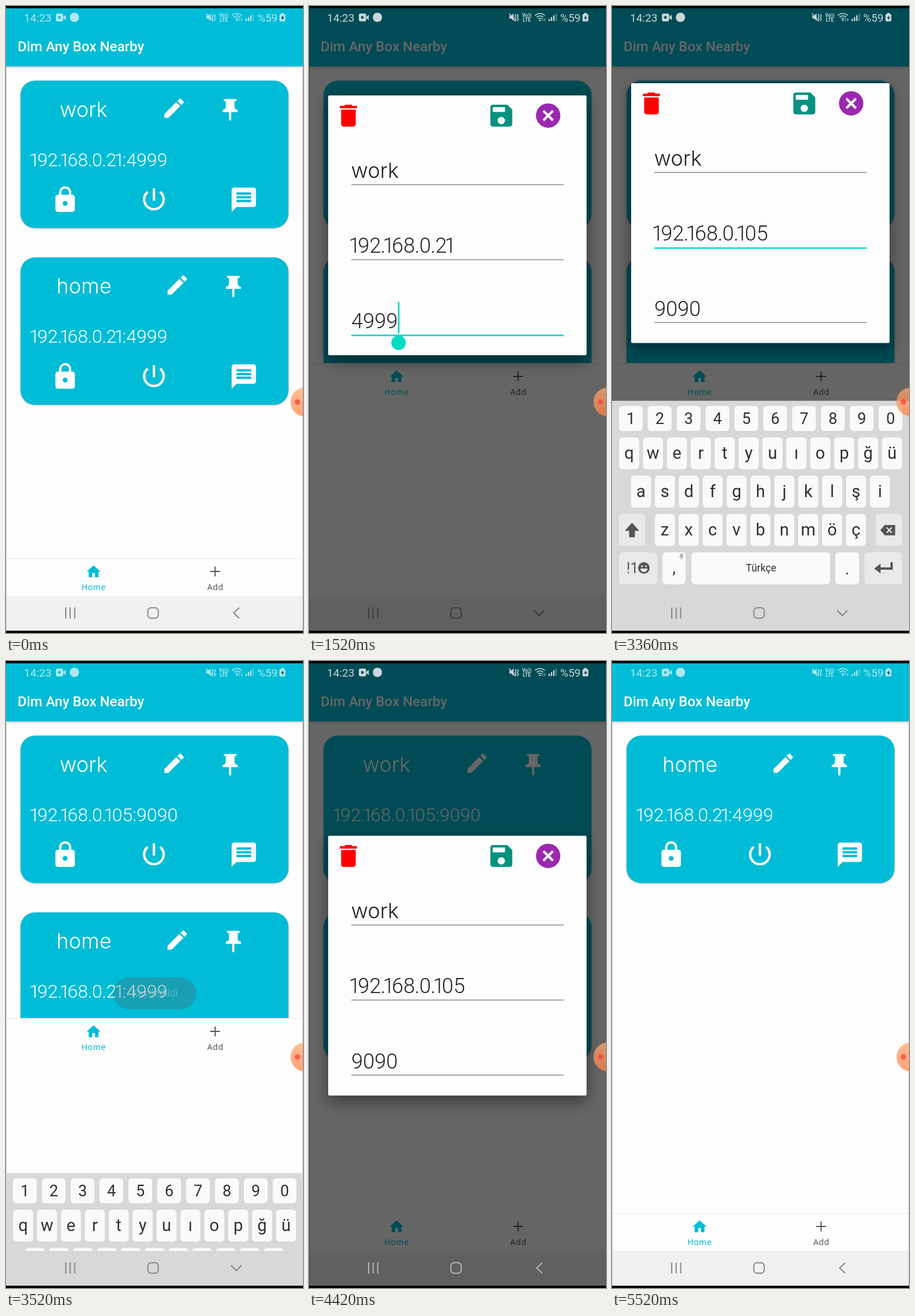
These frames come from a looping animation (512x1080 px, 5.57 s). An HTML page with a canvas:

```html
<!DOCTYPE html>
<html lang="en">
<head>
<meta charset="utf-8">
<title>Phone remote demo</title>
<style>
html, body { margin: 0; width: 100%; height: 100%; overflow: hidden; background: #000; }
canvas { display: block; width: 512px; height: 1080px; }
</style>
</head>
<body>
<canvas id="stage" width="512" height="1080"></canvas>
<script>
const g = document.getElementById('stage').getContext('2d');
const LOOP = 5570, CYAN = '#00bcd6', TEAL = '#03dac5';
const OPEN = 1000, FOCUS = 1360, RESIZE = 1420, SAVE = 3470, REOPEN = 4360, REMOVE = 4940;

const icons = {
  edit: 'M3 17.25V21h3.75L17.81 9.94l-3.75-3.75L3 17.25zM20.71 7.04c.39-.39.39-1.02 0-1.41l-2.34-2.34c-.39-.39-1.02-.39-1.41 0l-1.83 1.83 3.75 3.75 1.83-1.83z',
  pin: 'M16 9V4h1c.55 0 1-.45 1-1s-.45-1-1-1H7c-.55 0-1 .45-1 1s.45 1 1 1h1v5c0 1.66-1.34 3-3 3v2h5.97v7l1 1 1-1v-7H19v-2c-1.66 0-3-1.34-3-3z',
  lock: 'M18 8h-1V6c0-2.76-2.24-5-5-5S7 3.24 7 6v2H6c-1.1 0-2 .9-2 2v10c0 1.1.9 2 2 2h12c1.1 0 2-.9 2-2V10c0-1.1-.9-2-2-2zm-6 9c-1.1 0-2-.9-2-2s.9-2 2-2 2 .9 2 2-.9 2-2 2zm3.1-9H8.9V6c0-1.71 1.39-3.1 3.1-3.1s3.1 1.39 3.1 3.1v2z',
  power: 'M13 3h-2v10h2V3zm4.83 2.17l-1.42 1.42C17.99 7.86 19 9.81 19 12c0 3.87-3.13 7-7 7s-7-3.13-7-7c0-2.19 1.01-4.14 2.58-5.42L6.17 5.17C4.23 6.82 3 9.26 3 12c0 4.97 4.03 9 9 9s9-4.03 9-9c0-2.74-1.23-5.18-3.17-6.83z',
  chat: 'M20 2H4c-1.1 0-2 .9-2 2v18l4-4h14c1.1 0 2-.9 2-2V4c0-1.1-.9-2-2-2zM6 9h12v2H6zm0 3h12v2H6zm0-6h12v2H6z',
  home: 'M10 20v-6h4v6h5v-8h3L12 3 2 12h3v8z',
  trash: 'M6 19c0 1.1.9 2 2 2h8c1.1 0 2-.9 2-2V7H6v12zM19 4h-3.5l-1-1h-5l-1 1H5v2h14V4z',
  save: 'M17 3H5c-1.1 0-2 .9-2 2v14c0 1.1.9 2 2 2h14c1.1 0 2-.9 2-2V7l-4-4zm-5 16c-1.66 0-3-1.34-3-3s1.34-3 3-3 3 1.34 3 3-1.34 3-3 3zm3-10H5V5h10v4z',
  erase: 'M22 5H8L2 12l6 7h14zM18 15l-1.2 1.2-2.8-2.9-2.8 2.9L10 15l2.9-3L10 9l1.2-1.2 2.8 2.9 2.8-2.9L18 9l-2.9 3z',
  mute: 'M3 9v6h4l5 5V4L7 9z'
};

const portSteps = [[0, '4999'], [1790, '499'], [1870, '49'], [1940, '4'], [2010, ''],
  [2130, '9'], [2260, '90'], [2370, '909'], [2470, '9090']];
const ipSteps = ['21', '2', '', '1', '10', '105'].map((end, i) =>
  [[0, 2680, 2750, 2850, 2950, 3050][i], '192.168.0.' + end]);

const clamp = v => Math.max(0, Math.min(1, v));
const ramp = (t, from, to) => clamp((t - from) / (to - from));
const pulse = (t, in0, in1, out0, out1) => ramp(t, in0, in1) * (1 - ramp(t, out0, out1));
const current = (steps, t) => steps.filter(s => s[0] <= t).pop()[1];

function rect(x, y, w, h, color) {
  g.fillStyle = color;
  g.fillRect(x, y, w, h);
}
function round(x, y, w, h, r, color) {
  g.fillStyle = color;
  g.beginPath();
  g.roundRect(x, y, w, h, r);
  g.fill();
}
function disc(x, y, r, color) {
  g.fillStyle = color;
  g.beginPath();
  g.arc(x, y, r, 0, 7);
  g.fill();
}
function line(color, width, ...pts) {
  g.strokeStyle = color;
  g.lineWidth = width;
  g.beginPath();
  for (let i = 0; i < pts.length; i += 2) g.lineTo(pts[i], pts[i + 1]);
  g.stroke();
}
function shape(path, color) {
  g.fillStyle = color;
  g.fill(new Path2D(path), 'evenodd');
}
function icon(name, x, y, scale, color) {
  g.save();
  g.translate(x, y);
  g.scale(scale, scale);
  shape(icons[name], color);
  g.restore();
}
function label(s, x, y, font, color, align = 'left', spacing = 0) {
  g.font = font + ', sans-serif';
  g.fillStyle = color;
  g.textAlign = align;
  g.letterSpacing = spacing + 'px';
  g.fillText(s, x, y);
  const width = g.measureText(s).width;
  g.letterSpacing = '0px';
  return width;
}
function name(s, x, y, color) {
  return x + label(s, x, y, '300 36px Inter', color);
}
// Light digits with tight "1" and punctuation; returns the end position.
function digits(s, x, y, size, color) {
  g.font = `300 ${size}px Roboto, sans-serif`;
  g.fillStyle = color;
  g.textAlign = 'center';
  for (const c of s) {
    const step = c === '1' ? size * .31 : /\d/.test(c) ? g.measureText(c).width : size * .21;
    g.fillText(c, x + step / 2, y);
    x += step;
  }
  return x;
}
function shadow(color, blur, dx, dy, draw) {
  g.save();
  g.shadowColor = color;
  g.shadowBlur = blur;
  g.shadowOffsetX = dx;
  g.shadowOffsetY = dy;
  draw();
  g.restore();
}

function card(y, title, address) {
  const dx = title === 'home' ? 5.5 : 0;
  shadow('rgba(0,0,0,.25)', 3, 0, 1, () => round(25, y, 462, 254, 25, CYAN));
  name(title, dx ? 87 : 92.5, y + 62, '#fff');
  digits(address, 44, y + 147, 32, '#fff');
  icon('edit', 267.5 + dx, y + 25.5, 1.85, '#fff');
  icon('pin', 364 + dx, y + 28, 1.87, '#fff');
  icon('lock', 76.8, y + 180, 2.1, '#fff');
  icon('power', 229.8, y + 179.5, 2.1, '#fff');
  icon('chat', 384.8, y + 180, 2.1, '#fff');
}

function tabs(y) {
  rect(0, y, 512, 64, '#fdfdfd');
  rect(0, y - 1, 512, 1.5, '#ececec');
  icon('home', 136.6, y + 8, 1.2, CYAN);
  label('Home', 130, y + 54, '14px "Noto Sans"', CYAN, 'left', .6);
  line('#555', 2, 352, y + 22, 369, y + 22);
  line('#555', 2, 360.5, y + 13.5, 360.5, y + 30.5);
  label('Add', 347, y + 54, '14px "Noto Sans"', '#555', 'left', .6);
}

function page(t, small) {
  rect(0, 4, 512, 1072, '#fdfdfd');
  shadow('rgba(0,0,0,.3)', 4, 0, 1, () => rect(0, 4, 512, 100, CYAN));
  label('Dim Any Box Nearby', 20, 78, '500 24px Roboto', '#fff');
  if (t < REMOVE) card(128.5, 'work', t < SAVE ? '192.168.0.21:4999' : '192.168.0.105:9090');
  card(t < REMOVE ? 433 : 128.5, 'home', '192.168.0.21:4999');
  if (small) rect(0, 680, 512, 336, '#fdfdfd');
  tabs(small ? 616 : 952);
  rect(0, 1016, 512, 60, '#f1f1f1');
  rect(0, 104, 1, 972, '#c8c8c8');
  rect(511, 104, 1, 972, '#c8c8c8');
}

function dialog(t, y) {
  shadow('rgba(0,0,0,.45)', 26, 0, 10, () => round(33, y, 445.5, 447.5, 2.5, '#fdfdfd'));
  icon('trash', 42.8, y + 9.7, 2.1, '#f00');
  icon('save', 306.3, y + 9.7, 2.1, '#079180');
  disc(412.3, y + 34.7, 21, '#9c27b0');
  line('#fff', 4.2, 404, y + 26.4, 420.6, y + 43);
  line('#fff', 4.2, 404, y + 43, 420.6, y + 26.4);

  const focus = t < FOCUS || t >= SAVE ? 0 : t < 2600 ? 2 : 1;
  const values = ['work', current(ipSteps, t), current(portSteps, t)];
  values.forEach((value, i) => {
    const base = y + 142 + i * 129.3, active = focus && focus === i;
    const end = i ? digits(value, 73, base, 36, '#222') : name(value, 72.5, base, '#222');
    if (active) rect(73, base + 11.4, 366, 2.6, TEAL);
    else rect(73, base + 11, 366, 1.4, '#858585');
    if (!active || t > 3200) return;
    rect(end + .5, base - 45, 2.6, 54, TEAL);
    if (t < 1740 || t >= 2600 && t < 2680) {
      const x = end + 1.5, top = base + 10.5;
      disc(x, top + 15, 12.5, TEAL);
      g.beginPath();
      g.moveTo(x, top);
      g.lineTo(x + 10, top + 8);
      g.lineTo(x - 10, top + 8);
      g.fill();
    }
  });
}

function keyRow(chars, center, pitch, y, w, h, size) {
  [...chars].forEach((c, i) => {
    const x = center + i * pitch;
    round(x - w / 2, y, w, h, 6, '#fafafa');
    label(c, x, y + (h > 50 ? 37 : 31), size + 'px Roboto', '#303030', 'center');
  });
}

function keyboard(dy) {
  rect(0, 1016, 512, 60, '#d8d8d8');
  g.save();
  g.beginPath();
  g.rect(0, 4, 512, 1012);
  g.clip();
  g.translate(0, dy);
  rect(0, 680, 512, 396, '#d8d8d8');
  keyRow('1234567890', 32.5, 49.75, 689, 41, 43, 27);
  keyRow('qwertyuıopğü', 29.5, 41.2, 743, 34.5, 55, 29);
  keyRow('asdfghjklşi', 50, 41.2, 809, 34.5, 55, 29);
  keyRow('zxcvbnmöç', 91, 41.2, 875, 34.5, 55, 29);
  for (const [x, y, w] of [[12, 875, 45], [455, 875, 45], [12, 941, 66], [435, 941, 65]])
    round(x, y, w, 55, 6, '#e9e9e9');
  for (const [x, w] of [[87, 40], [137, 239], [385, 41]]) round(x, 941, w, 55, 6, '#fafafa');

  const dark = '#555';
  shape('M34.5 890L47 904H39.5V915H29.5V904H22Z', dark);
  icon('erase', 460, 887.5, 1.28, dark);
  label('!1', 25, 977, '25px Roboto', dark);
  disc(55, 968, 10, dark);
  disc(51.5, 965, 1.5, '#e9e9e9');
  disc(58.5, 965, 1.5, '#e9e9e9');
  shape('M49 969H61A6 6 0 0 1 49 969Z', '#e9e9e9');
  label(',', 107, 977, '28px Roboto', '#303030', 'center');
  label('.', 405.5, 979, '28px Roboto', '#303030', 'center');
  label('Türkçe', 257, 974, '17.5px Roboto', '#303030', 'center');
  round(117.5, 943, 4.5, 7, 2, '#aaa');
  line('#aaa', 1, 116, 948, 117.5, 951, 122, 951, 123.5, 948);
  line('#aaa', 1, 119.7, 951, 119.7, 954);
  line(dark, 4, 482, 958, 482, 969, 460, 969);
  shape('M452 969L463 960.5V977.5Z', dark);
  g.restore();
}

// Enlarged key shown just before its character is entered.
function keyPopup(t) {
  for (const steps of [portSteps, ipSteps]) {
    steps.forEach(([at, value], i) => {
      if (!i || value.length <= steps[i - 1][1].length || t < at - 60 || t >= at) return;
      const key = value.slice(-1);
      const x = Math.min(464, 32.5 + '1234567890'.indexOf(key) * 49.75);
      shadow('rgba(0,0,0,.2)', 5, 0, 1, () => round(x - 35, 588, 70, 83, 13, '#fafafa'));
      label(key, x, 648, '48px Roboto', '#222', 'center');
    });
  }
}

function navIcons(color, down) {
  for (const x of [103, 110.5, 118.5]) line(color, 2, x, 1036, x, 1055);
  g.beginPath();
  g.roundRect(244.5, 1036.5, 18, 18, 5.5);
  g.stroke();
  if (down) line(color, 2, 388, 1041, 397, 1050, 406, 1041);
  else line(color, 2, 402, 1036.5, 392.5, 1045.5, 402, 1054.5);
}

function status(dimmed) {
  const c = dimmed ? '#c8d8da' : '#b0e8f0', back = dimmed ? '#004b55' : CYAN;
  label('14:23', 31, 26.5, '19px Roboto', c);
  round(86, 13, 12.5, 13.5, 3, c);
  disc(92, 19.7, 2.4, back);
  shape('M98 19.7L103 15V24.5Z', c);
  disc(118, 19.5, 8, c);
  icon('mute', 343, 9.5, .8, c);
  line(c, 1.6, 345, 13, 356, 26);
  line(c, 1.4, 355, 14, 357, 17, 355, 20, 357, 23, 355, 26);
  line(c, 1.4, 359, 14, 361, 17, 359, 20, 361, 23, 359, 26);
  label('Vo))', 375.5, 18.5, '700 8.5px Roboto', c, 'center');
  label('LTE', 375.5, 26.5, '700 8.5px Roboto', c, 'center');
  g.strokeStyle = c;
  g.lineWidth = 1.6;
  for (const r of [4, 8, 12]) {
    g.beginPath();
    g.arc(398, 25, r, -2.35, -.79);
    g.stroke();
  }
  disc(398, 24.5, 1.5, c);
  line(c, 1, 403, 21, 403, 26);
  line(c, 1, 406.5, 21, 406.5, 26);
  [4, 7, 10, 13].forEach((h, i) => {
    g.globalAlpha = i === 3 ? .4 : 1;
    rect(413 + i * 4, 26 - h, 2.3, h, c);
  });
  g.globalAlpha = 1;
  label('%59', 433, 26.5, '19px Roboto', c);
  round(474, 12, 5, 3, 1, c);
  round(471.5, 14, 10, 12.5, 1.5, c);
  shape('M477.5 16L474 21H476V24.5L479.5 19.5H477.5Z', dimmed ? '#004b55' : '#045');
}

function bubble() {
  const tint = g.createLinearGradient(0, 657, 0, 707);
  tint.addColorStop(0, '#ffaa70');
  tint.addColorStop(1, '#fd8248');
  g.globalAlpha = .75;
  disc(515.5, 682, 25, tint);
  disc(502.5, 682, 4.8, '#f5453e');
  g.globalAlpha = 1;
}

// Hand-drawn ring, counterclockwise from the top.
function ring(t, start, cx, cy) {
  const sweep = ramp(t, start, start + 520) * 350;
  const alpha = 1 - ramp(t, start + 580, start + 790);
  if (!sweep || !alpha) return;
  g.save();
  g.globalAlpha = alpha;
  g.lineCap = g.lineJoin = 'round';
  const pts = [];
  for (let a = 0; a <= sweep; a += 2) {
    const r = a * Math.PI / 180, grow = 1 + a / 6000;
    pts.push(cx - 47 * grow * Math.sin(r), cy - 45 * grow * Math.cos(r));
  }
  shadow('rgba(0,0,0,.28)', 14, 9, 9, () => line('#f00', 4.6, ...pts));
  g.restore();
}

function toast(s, w, y, alpha) {
  if (!alpha) return;
  g.globalAlpha = alpha * .92;
  round(256.5 - w / 2, y, w, 55, 27.5, '#525c5e');
  label(s, 256.5, y + 33, '17.5px Roboto', '#f0f0f0', 'center');
  g.globalAlpha = 1;
}

function draw(t) {
  const small = t >= RESIZE && t < 3570;
  const open = t >= OPEN && t < SAVE || t >= REOPEN && t < REMOVE;
  const slide = pulse(t, 1570, 1680, SAVE, 3570);
  rect(0, 0, 512, 1080, '#000');
  page(t, small);
  if (open) {
    rect(0, 4, 512, 1072, 'rgba(0,0,0,.6)');
    const left = (1 - ramp(t, RESIZE, RESIZE + 157)) ** 2;
    dialog(t, t < SAVE ? Math.round(133 + 168 * left) : 301);
  }
  if (slide) keyboard(396 * (1 - slide));
  keyPopup(t);
  navIcons(!open || slide ? '#868686' : small ? '#3a3a3a' : '#b5b5b5', small);
  status(open);
  toast('Kaydedildi', 143, 545, pulse(t, 3490, 3590, 3950, 4150));
  toast('Silindi', 111, 881, pulse(t, REMOVE, 5100, 5400, 5520));
  bubble();
  ring(t, 50, 290, 176);
  ring(t, 1850, 330, 165);
}

function tick() {
  draw(performance.now() % LOOP);
  requestAnimationFrame(tick);
}
tick();
</script>
</body>
</html>
```
